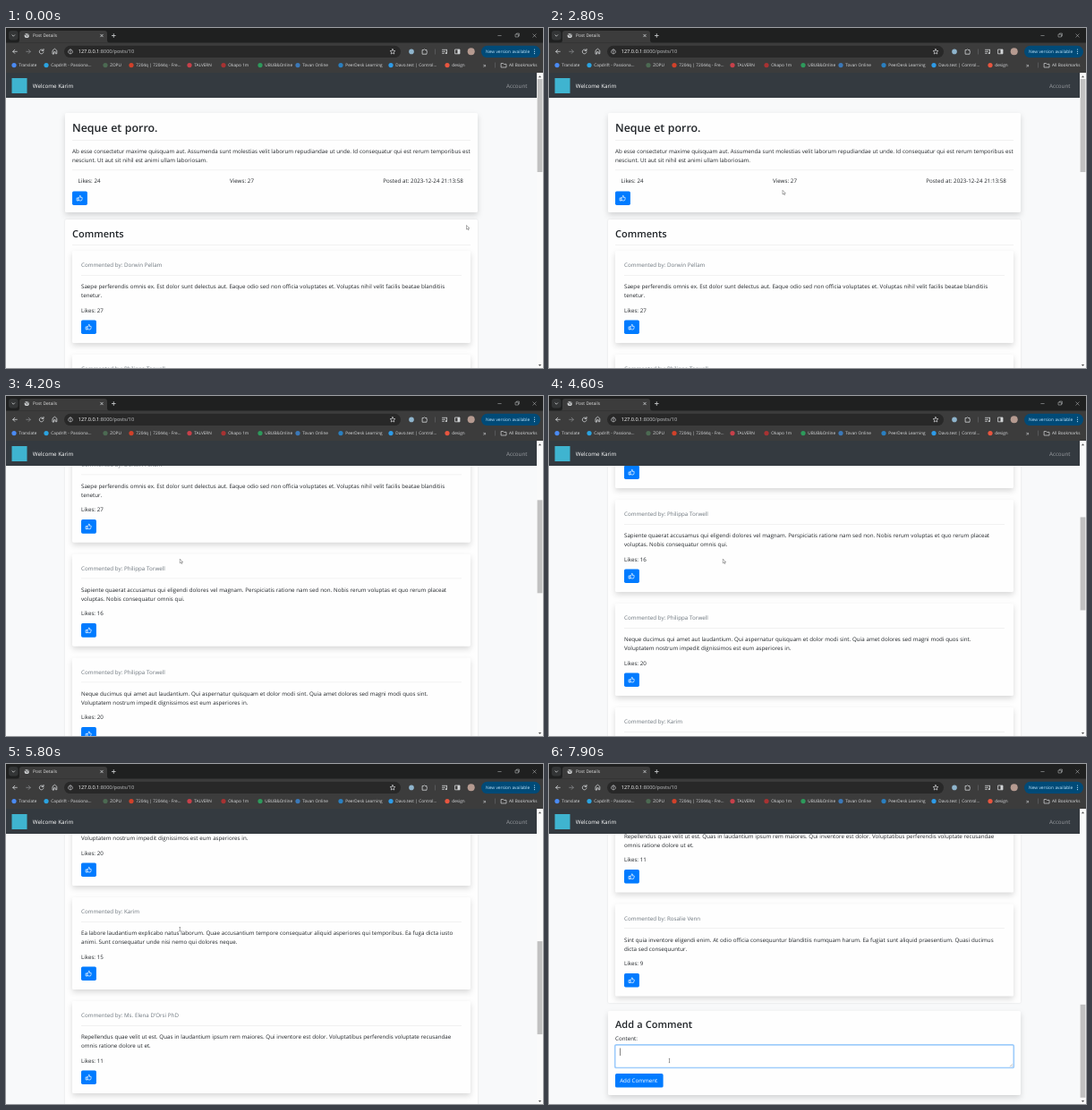
An HTML page that plays this animation: 600 by 380 pixels, repeating every 8 s.

```html
<!DOCTYPE html>
<html lang="en">
<head>
<meta charset="utf-8">
<title>Post Details</title>
<style>
  html, body { margin: 0; width: 100%; height: 100%; overflow: hidden; background: #f8f9fa; }
  svg { display: block; width: 600px; height: 380px; }
  text { font-family: "Open Sans", "Noto Sans", sans-serif; text-rendering: geometricPrecision; white-space: pre; word-spacing: .03em; }
  .shadow { filter: drop-shadow(0 3.3px 3.3px rgba(0, 0, 0, .15)); }
  .soft { filter: drop-shadow(0 .6px 1px rgba(0, 0, 0, .1)); }
  .line { fill: none; stroke: #d4d6d8; stroke-width: .8; stroke-linecap: round; stroke-linejoin: round; }
</style>
</head>
<body>
<svg id="stage" viewBox="0 0 600 380"></svg>
<script>
const BODY = 6.21, INK = '#212529', MUTED = '#6c757d', BLUE = '#007bff';

// y is the vertical middle of the capitals
const text = (x, y, str, size = BODY, fill = INK, weight = 400) =>
  `<text x="${x}" y="${y + size * .36}" font-size="${size}" fill="${fill}" font-weight="${weight}">${str}</text>`;
const rect = (x, y, w, h, fill, r = 0, extra = '') =>
  `<rect x="${x}" y="${y}" width="${w}" height="${h}" rx="${r}" fill="${fill}" ${extra}/>`;
const dot = (x, y, r, fill) => `<circle cx="${x}" cy="${y}" r="${r}" fill="${fill}"/>`;
const line = (d, extra = '') => `<path class="line" d="${d}" ${extra}/>`;
const rule = (x, y, w) => rect(x, y, w, .5, 'rgba(0,0,0,.1)');
const card = (x, y, w, h, kind = 'shadow') => rect(x, y, w, h, '#fefefe', 1.6, `class="${kind}"`);

const likeButton = (x, y) => rect(x, y, 16.9, 15.6, BLUE, 1.7) +
  line('M0 3H1.7V6.4H0ZM1.7 3.2 3.1 1.5 3.5 0C4.6-.1 4.7 1.1 4.1 2.4H6C6.9 2.5 6.7 3.5 6.3 3.7 6.7 4.3 6.4 4.9 6 5 6.2 5.8 5.7 6.4 5.1 6.4H3.3L1.7 5.9',
    `style="stroke:#fff" transform="translate(${x + 5.5} ${y + 4.9}) scale(.88)"`);

const comments = [
  ['Dorwin Pellam', 27, 'Saepe perferendis omnis ex. Est dolor sunt delectus aut. Eaque odio sed non officia voluptates et. Voluptas nihil velit facilis beatae blanditiis', 'tenetur.'],
  ['Philippa Torwell', 16, 'Sapiente quaerat accusamus qui eligendi dolores vel magnam. Perspiciatis ratione nam sed non. Nobis rerum voluptas et quo rerum placeat', 'voluptas. Nobis consequatur omnis qui.'],
  ['Philippa Torwell', 20, 'Neque ducimus qui amet aut laudantium. Qui aspernatur quisquam et dolor modi sint. Quia amet dolores sed magni modi quos sint.', 'Voluptatem nostrum impedit dignissimos est eum asperiores in.'],
  ['Karim', 15, 'Ea labore laudantium explicabo natus laborum. Quae accusantium tempore consequatur aliquid asperiores qui temporibus. Ea fuga dicta iusto', 'animi. Sunt consequatur unde nisi nemo qui dolores neque.'],
  ['Ms. Elena D’Orsi PhD', 11, 'Repellendus quae velit ut est. Quas in laudantium ipsum rem maiores. Qui inventore est dolor. Voluptatibus perferendis voluptate recusandae', 'omnis ratione dolore ut et.'],
  ['Rosalie Venn', 9, 'Sint quia inventore eligendi enim. At odio officia consequuntur blanditiis numquam harum. Ea fugiat sunt aliquid praesentium. Quasi ducimus', 'dicta sed consequuntur.'],
];
const PITCH = 116, FIRST = 249;

const comment = ([name, likes, a, b], i) => {
  const y = FIRST + i * PITCH;
  return card(74, y, 445, 103) + text(84, y + 16.2, 'Commented by: ' + name, BODY, MUTED) +
    rule(84, y + 27, 425) + text(84, y + 39.8, a) + text(84, y + 49.8, b) +
    text(84, y + 66.3, 'Likes: ' + likes) + likeButton(84, y + 77.4);
};

const post = card(66, 95, 461, 111) +
  text(74, 111.2, 'Neque et porro.', 12.4, INK, 600) + rule(74, 125.2, 445) +
  text(74, 138, 'Ab esse consectetur maxime quisquam aut. Assumenda sunt molestias velit laborum repudiandae ut unde. Id consequatur qui est rerum temporibus est') +
  text(74, 148, 'nesciunt. Ut aut sit nihil est animi ullam laboriosam.') + rule(74, 158.6, 445) +
  text(80.6, 171.2, 'Likes: 24') + text(250, 171.2, 'Views: 27') +
  text(421.3, 171.2, 'Posted at: 2023-12-24 21:13:58') + likeButton(74, 182.4);

const form = card(66, 948.5, 461, 94) +
  text(74, 963.8, 'Add a Comment', 11, INK, 600) + text(74, 978.8, 'Content:') +
  rect(73.7, 986.4, 445.6, 25.6, '#fff', 1.8, 'id="field"') +
  line('M515.2 1010.4l2.4-2.4M516.7 1010.5l1-1', 'style="stroke:#777;stroke-width:.4"') +
  rect(79.2, 990, .6, 8.5, '#333', 0, 'id="caret"') +
  rect(74, 1018.5, 53.6, 15.6, BLUE, 1.7) + text(79.2, 1026.4, 'Add Comment', BODY, '#fff');

const page = `<g id="page">${post}${card(66, 214, 461, 725.5, 'soft')}
  ${text(74, 229.6, 'Comments', 11, INK, 600)}${rule(74, 242.2, 445)}
  ${comments.map(comment).join('')}${form}</g>`;

const scrollbar = rect(593, 50, 7, 330, '#fafafa') + rect(593.6, 57, 5.8, 104, '#c1c1c1', 0, 'id="thumb"') +
  '<path d="M594.9 55.2l1.6-2 1.6 2zM594.9 376l1.6 2 1.6-2z" fill="#505050"/>';

const navbar = rect(0, 50, 593, 28, '#343a40') + rect(6.5, 56, 17, 17, '#3fb4d0') +
  text(29.8, 64.9, 'Welcome Karim', BODY, '#fff') + text(559, 64.9, 'Account', BODY, '#999ca0');

const tabs = rect(0, 0, 600, 50, '#3c3c3c') + rect(0, 0, 600, 16.5, '#1f2020') +
  '<path d="M12 16.5q3 0 3-3V6q0-3 3-3h92q3 0 3 3v7.5q0 3 3 3z" fill="#3c3c3c"/>' +
  rect(3, 3, 10.5, 10.5, '#333536', 3) + line('M6.9 7.8l1.4 1.4 1.4-1.4') +
  dot(23.2, 8.5, 2.6, '#c9cbcd') + line('M21 7.3l2 .6.4 1.5M24 6.5l1 1.5', 'style="stroke:#3c3c3c;stroke-width:.7"') +
  text(30, 8.5, 'Post Details', 4.93, '#e3e3e3') +
  line('M105.7 7.2l2.6 2.6m0-2.6l-2.6 2.6M120.3 6.6v3.8M118.4 8.5h3.8') +
  line('M549.8 8.5h3.4M569.4 7h3v3h-3zM570.4 6.8v-.8h3v3h-.8M588.8 6.8l3.4 3.4m0-3.4l-3.4 3.4', 'style="stroke-width:.45"');

const toolbar = rect(65, 19.7, 376, 13.4, '#282828', 6.7) +
  line('M12.3 26.3h-4.600m2.1-2.1L7.7 26.3l2.1 2.1') +
  line('M22.7 26.3h4.6m-2.1-2.1 2.1 2.1-2.1 2.1', 'style="stroke:#85878a"') +
  line('M41.6 25A2.4 2.4 0 1 0 42 27M42 23.4v2h-2') +
  line('M52 28.7v-3.5l2.4-2 2.4 2v3.5h-1.5v-2h-1.8v2z') +
  line('M72 24a2.4 2.4 0 1 0 .01 0M72 26v1.3M72 25.1v.01', 'style="stroke-width:.7"') +
  text(80.7, 26.4, '127.0.0.1<tspan fill="#c4c6c8">:8000/posts/10</tspan>', 5.58, '#fff') +
  line('M432 23.5l.8 1.9 2.1.2-1.6 1.4.5 2-1.8-1.1-1.8 1.1.5-2-1.6-1.4 2.1-.2z', 'style="stroke-width:.7"') +
  dot(453, 26.4, 2.8, '#8eb4cc') +
  line('M465.5 24.5h1.3q.7-1.7 1.5 0h1.7v1.7q1.5.8 0 1.5v1.5h-4.5z') +
  rect(479, 23.5, .6, 6, '#6a6c6e') +
  line('M487.5 24.3h5M487.5 26.3h3M487.5 28.3h2M492.5 24.5v3.5') + dot(491.8, 28.2, .9, '#d4d6d8') +
  line('M502 24h5v4.8h-5z') + rect(504.5, 24, 2.5, 4.8, '#d4d6d8') +
  dot(519.7, 26.3, 4, '#b59a90') +
  rect(531, 19.7, 66, 13.4, '#004a77', 6.7) + text(536, 26.4, 'New version available', 4.85, '#c2e7ff') +
  [24, 26.3, 28.6].map(y => dot(590.5, y, .6, '#c2e7ff')).join('');

const bookmarks = [
  [9, 'Translate', '#4a8af4'], [45, 'Capdrift - Passiona...', '#2aa3e0'], [111, 'ZOPU', '#4c6a52'],
  [140, '7204q | 72044q - Fre...', '#d1412a'], [205, 'TALVERN', '#c8404a'], [243, 'Okapo 1m', '#a83232'],
  [284, 'UBUB&amp;Online', '#2d9a5b'], [326, 'Tovan Online', '#3b78b8'], [374, 'PeerDesk Learning', '#2a7fc0'],
  [430, 'Davo.test | Control...', '#2d9be8'], [493, 'design', '#e8553f'],
].map(([x, name, color]) => dot(x, 41.6, 2.6, color) + text(x + 5.3, 41.7, name, 4.72, '#dcdee0')).join('') +
  text(533, 41.2, '»', 7, '#dcdee0') + rect(546, 38.5, .6, 6, '#6a6c6e') +
  line('M553.5 39.5h2l.8.9h2.7v3.6h-5.5z', 'style="stroke-width:.7"') +
  text(562, 41.7, 'All Bookmarks', 4.72, '#dcdee0');

const pointers = `<g id="pointer">
  <path id="arrow" d="M0 0V4.600l1.100-.9.8 1.600.7-.3-.7-1.600h1.400z" fill="#fff" stroke="#333" stroke-width=".4"/>
  <path id="beam" d="M-.7-2.2H.7M0-2.2V2.2M-.7 2.2H.7" fill="none" stroke="#444" stroke-width=".5"/></g>`;

const byId = id => document.getElementById(id);
byId('stage').innerHTML = rect(0, 0, 600, 380, '#f8f9fa') + page + scrollbar + navbar + tabs + toolbar + bookmarks + pointers;

const scrollKeys = [[3300, 0], [3500, 22], [3800, 95], [4400, 235], [4600, 249], [4800, 249], [5000, 278],
  [5700, 430], [5800, 448], [6000, 468.5], [6300, 468.5], [6400, 485], [6500, 516.5], [6900, 655], [7000, 672.5]];
const pointerKeys = [[0, 514.5, 220.5], [2800, 261, 181.3], [3300, 222, 181.3], [3400, 197, 181],
  [4200, 194.3, 182.2], [7500, 160, 285], [7700, 134.5, 331.5]];

function scrollAt(t) {
  const i = scrollKeys.findIndex(k => k[0] > t);
  if (i === 0) return 0;
  if (i < 0) return scrollKeys.at(-1)[1];
  const [t0, a] = scrollKeys[i - 1], [t1, b] = scrollKeys[i];
  return a + (b - a) * (t - t0) / (t1 - t0);
}

function draw(now) {
  const t = Math.floor(now % 8000 / 100) * 100; // ten pictures a second
  const scroll = scrollAt(t);
  const [, x, y] = pointerKeys.findLast(k => k[0] <= t);
  const row = (y + 2 + scroll - FIRST) % PITCH;
  const overText = t >= 7700 || (t >= 3400 && t < 7500 && row > 34.5 && row < 54);
  const focused = t >= 7800;

  byId('page').setAttribute('transform', `translate(0 ${-scroll})`);
  byId('thumb').setAttribute('y', 57 + scroll * .315);
  byId('pointer').setAttribute('transform', `translate(${x} ${overText && t < 7700 ? y + 2.5 : y})`);
  byId('arrow').style.display = overText ? 'none' : '';
  byId('beam').style.display = overText ? '' : 'none';
  byId('caret').style.display = focused ? '' : 'none';
  byId('field').style.cssText = focused ? 'stroke:#a0cdfb;stroke-width:1.7' : 'stroke:#ced4da;stroke-width:.5';
  requestAnimationFrame(draw);
}
requestAnimationFrame(draw);
</script>
</body>
</html>
```
